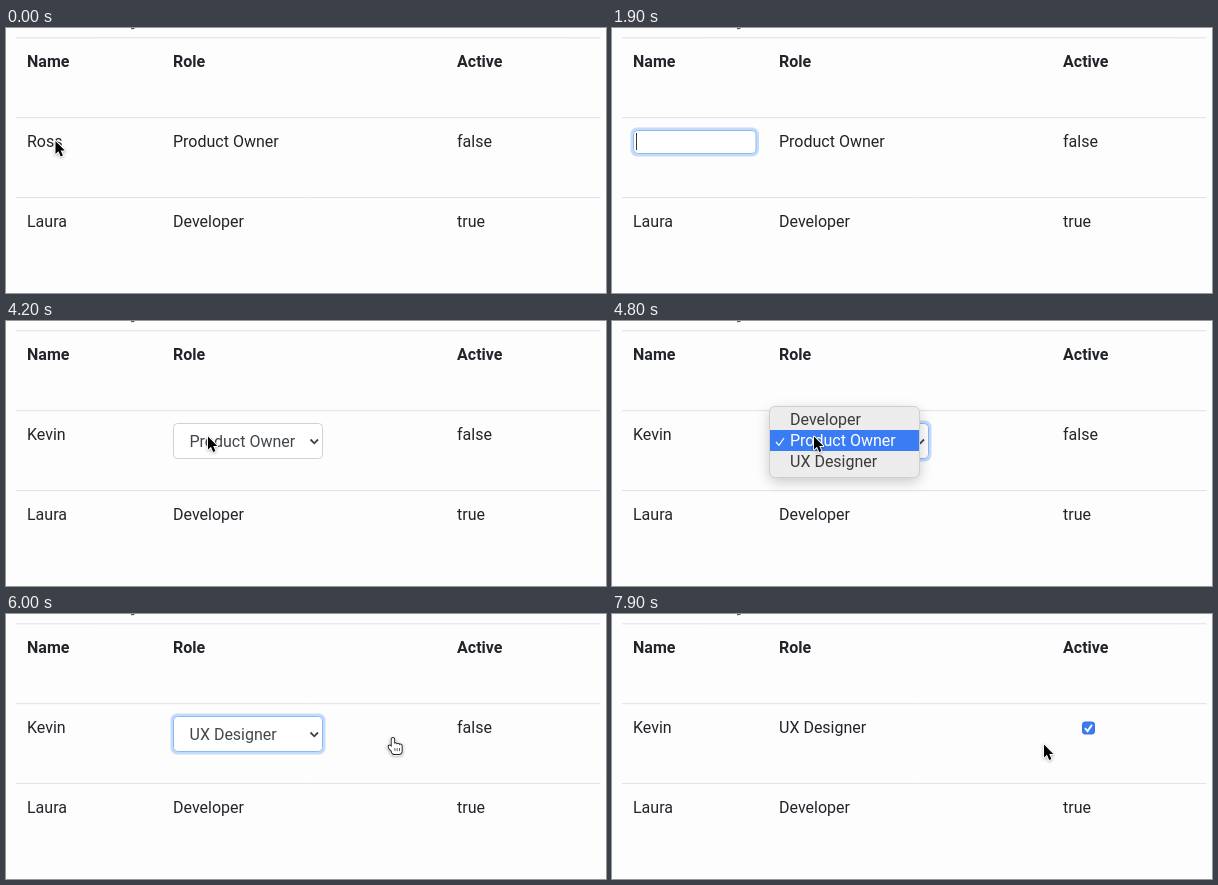
Write an HTML page with a canvas that moves like this. It is 600 px wide and 265 px high and loops after 8 s.

```html
<!DOCTYPE html>
<html lang="en">
<head>
<meta charset="utf-8">
<title>Editable table</title>
<style>
html, body { margin: 0; width: 100%; height: 100%; overflow: hidden; background: #fefdfe; }
canvas { display: block; }
</style>
</head>
<body>
<canvas id="stage" width="600" height="265"></canvas>
<script>
const ctx = document.getElementById('stage').getContext('2d');
const LOOP = 8000, STEP = 100;
const FONT = 'Roboto, "Liberation Sans", sans-serif';
const INK = '#212529', FIELD_INK = '#42474c', BLUE = '#3a7cf3';
const ROLES = ['Developer', 'Product Owner', 'UX Designer'];
const OLD_NAME = 'Ross', NEW_NAME = 'Kevin';
const [NAME_X, ROLE_X, ACTIVE_X] = [21, 167, 451];
const ROW = 80, BASE = 39, CELL_Y = BASE + ROW;

// When each cell turns into a control, and the other turning points
const OPEN = { name: 900, role: 3800, menu: 4400, active: 6700 };
const TYPE = 1900, LEAVE = 2900, PICK = 5600, CHECK = 7300;
const CLICKS = [600, 800, 3200, 3400, 4300, 6200, 6400, 7200];

// Pointer moves: start, end, x, y
const START = [49.5, 113];
const MOVES = [
  [TYPE, 2000, 53, 113],
  [LEAVE, 3200, 202, 115.5],
  [5000, 5200, 209, 136.5],
  [PICK, 6250, 476, 118],
  [7800, 7900, 432, 130.5]
];

const clamp = v => Math.min(1, Math.max(0, v));
const ease = p => p * p * (3 - 2 * p);
const within = (t, from, to) => t >= from && t < to;

function pointerAt(t) {
  let [x, y] = START;
  for (const [from, to, mx, my] of MOVES) {
    const k = ease(clamp((t - from) / (to - from)));
    x += (mx - x) * k;
    y += (my - y) * k;
  }
  return [x, y];
}

function text(s, x, y, color = INK, weight = 400) {
  ctx.font = `${weight} 16px ${FONT}`;
  ctx.fillStyle = color;
  ctx.fillText(s, x, y);
}

function line(points, color, width) {
  ctx.beginPath();
  points.forEach(p => ctx.lineTo(...p));
  ctx.strokeStyle = color;
  ctx.lineWidth = width;
  ctx.stroke();
}

function box(x, y, w, h, r, fill, border, width = 1) {
  ctx.beginPath();
  ctx.roundRect(x, y, w, h, r);
  if (fill) {
    ctx.fillStyle = fill;
    ctx.fill();
  }
  ctx.shadowColor = 'transparent';
  ctx.strokeStyle = border;
  ctx.lineWidth = width;
  ctx.stroke();
}

function tick(x, y, size, color, width) {
  line([[x, y], [x + size * .37, y + size * .42], [x + size, y - size * .5]], color, width);
}

function shadow(blur, y, alpha) {
  ctx.shadowColor = `rgba(0,0,0,${alpha})`;
  ctx.shadowBlur = blur;
  ctx.shadowOffsetY = y;
}

function field(x, y, w, h, focus) {
  if (focus) box(x - 1, y - 1, w + 2, h + 2, 5, null, '#c3dcfa', 3);
  box(x + .5, y + .5, w - 1, h - 1, 4, '#fff', focus ? '#8db9f3' : '#ced2d9');
}

function drawTable() {
  ctx.fillStyle = '#fefdfe';
  ctx.fillRect(0, 0, 600, 265);
  line([[125, .5], [128.5, .3]], '#55585b', 1.3);
  for (let i = 0; i < 3; i++) {
    const y = 9.8 + i * (ROW - .1);
    line([[10, y], [594.5, y]], '#dfe0e6', 1);
  }
  text('Name', NAME_X, BASE, INK, 700);
  text('Role', ROLE_X, BASE, INK, 700);
  text('Active', ACTIVE_X, BASE, INK, 700);
  text('Laura', NAME_X, CELL_Y + ROW);
  text(ROLES[0], ROLE_X, CELL_Y + ROW);
  text('true', ACTIVE_X, CELL_Y + ROW);
}

function drawName(t) {
  if (!within(t, OPEN.name, OPEN.role)) {
    text(t < OPEN.name ? OLD_NAME : NEW_NAME, NAME_X, CELL_Y);
    return;
  }
  field(NAME_X, 102, 123.5, 24, true);
  const typing = t >= TYPE, x = NAME_X + 3;
  const value = typing ? NEW_NAME.slice(0, Math.ceil((t - TYPE) / 170)) : OLD_NAME;
  ctx.font = `400 16px ${FONT}`;
  const end = x + ctx.measureText(value).width;
  if (!typing) {
    ctx.fillStyle = '#b3d6fd';
    ctx.fillRect(x, 105, end - x, 18);
  }
  text(value, x, CELL_Y, FIELD_INK);
  if (typing) line([[end + .5, 105], [end + .5, 122]], '#33373b', 1);
}

function drawRole(t) {
  const role = ROLES[t < PICK ? 1 : 2];
  if (!within(t, OPEN.role, OPEN.active)) {
    text(role, ROLE_X, CELL_Y);
    return;
  }
  field(ROLE_X, 102, 150, 36, t >= OPEN.menu);
  text(role, 183.5, 125.5, FIELD_INK);
  line([[304.5, 118.5], [308.3, 122.3], [312, 118.5]], '#3f4449', 1.8);
  if (within(t, OPEN.menu, PICK)) drawMenu(t);
}

function drawMenu(t) {
  shadow(14, 4, .22);
  box(157.5, 85.5, 150, 71, 5.5, '#edecec', '#d0cfd0');
  // The picked row blinks once before the menu closes
  const blink = t === PICK - 2 * STEP;
  const hover = blink ? -1 : Math.floor((pointerAt(t)[1] - 88) / 21);
  ROLES.forEach((role, i) => {
    const y = 88 + i * 21, color = i === hover ? '#fff' : '#3a3a3c';
    if (i === hover) {
      ctx.fillStyle = BLUE;
      ctx.fillRect(158, y, 149, 21);
    }
    text(role, 178, y + 16, color);
    if (i === 1) tick(164, y + 12, 8, color, 1.2);
  });
}

function drawActive(t) {
  if (t < OPEN.active) {
    text('false', ACTIVE_X, CELL_Y);
    return;
  }
  const on = t >= CHECK;
  box(470.5, 108, 12, 12, 2.5, on ? BLUE : '#fff', on ? '#356fe0' : '#8b8b8d');
  if (on) tick(473, 114.2, 7, '#fff', 1.9);
}

function drawRing(t) {
  const start = CLICKS.filter(c => c <= t).pop();
  const p = (t - start) / 500;
  if (!(p > 0 && p < 1)) return;
  const [x, y] = pointerAt(t);
  ctx.beginPath();
  ctx.arc(x + 1, y + 2, 33 * (1 - (1 - p) ** 2), 0, 7);
  ctx.strokeStyle = `rgba(223,63,55,${1 - p})`;
  ctx.lineWidth = 2.3;
  ctx.stroke();
}

const ARROW = new Path2D('M0 0V13L3 10.3 5.2 15.4 7.4 14.4 5.2 9.5H9.3Z');
const BEAM = new Path2D('M-3 -7Q0 -7 0 -5V5Q0 7 -3 7M3 -7Q0 -7 0 -5V5Q0 7 3 7M-2 2H2');

function outline(path, color, width) {
  ctx.strokeStyle = color;
  ctx.lineWidth = width;
  ctx.stroke(path);
}

function drawArrow() {
  shadow(3, 1, .3);
  outline(ARROW, '#fff', 1.8);
  ctx.shadowColor = 'transparent';
  ctx.fillStyle = '#000';
  ctx.fill(ARROW);
}

function drawBeam() {
  ctx.translate(0, 1.5);
  outline(BEAM, 'rgba(255,255,255,.8)', 2.6);
  outline(BEAM, '#111', 1.2);
}

function drawHand() {
  const hand = new Path2D();
  for (let i = 0; i < 4; i++) {
    const top = i ? 4.5 + i * .6 : 0;
    hand.roundRect(-2.2 + i * 2.5, top, 2.5, 12 - top, 1.25);
  }
  hand.roundRect(-2.2, 8, 10, 8, 3);
  hand.ellipse(-3, 10.2, 1.4, 3.2, -.6, 0, 7);
  shadow(3, 1, .3);
  outline(hand, '#fff', 3.4);
  ctx.shadowColor = 'transparent';
  outline(hand, '#222', 2);
  ctx.fillStyle = '#fff';
  ctx.fill(hand);
  for (let i = 0; i < 3; i++) {
    const x = 1 + i * 2.3;
    line([[x, 10], [x, 13]], '#333', .8);
  }
}

function drawPointer(t) {
  if (within(t, TYPE, LEAVE)) return;
  const [x, y] = pointerAt(t);
  const inField = within(t, OPEN.name, OPEN.role) && x < 145;
  const onPage = within(t, LEAVE, OPEN.role) || within(t, PICK + 2 * STEP, OPEN.active);
  ctx.save();
  ctx.translate(x, y);
  ctx.lineJoin = 'round';
  if (inField) drawBeam();
  else if (onPage) drawHand();
  else drawArrow();
  ctx.restore();
}

function frame() {
  const t = Math.floor(performance.now() % LOOP / STEP) * STEP;
  drawTable();
  drawName(t);
  drawActive(t);
  drawRole(t);
  drawRing(t);
  drawPointer(t);
  requestAnimationFrame(frame);
}
frame();
</script>
</body>
</html>
```
